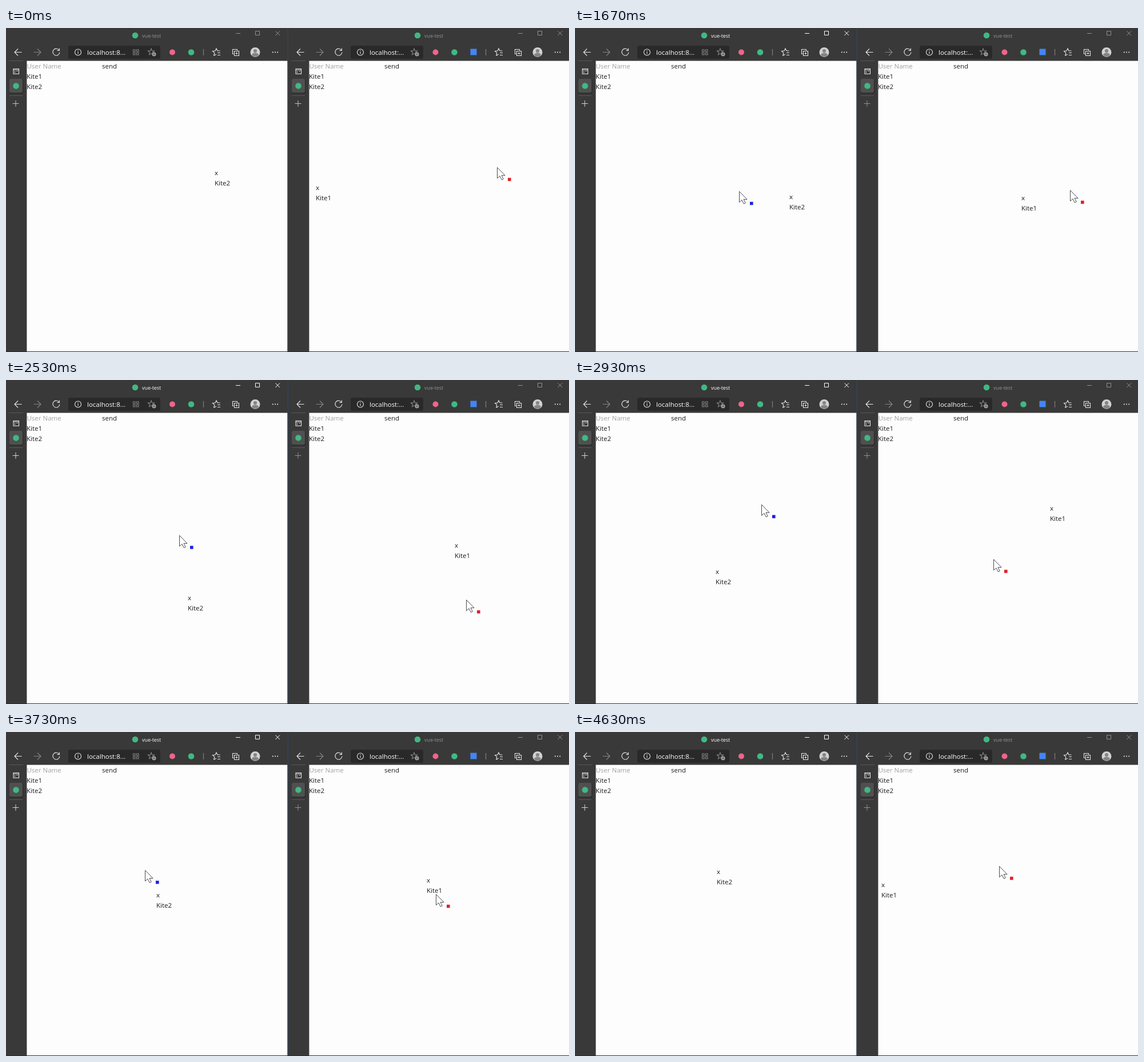
An HTML page for the animation above (5860 ms loop, 985x568 px).

```html
<!DOCTYPE html>
<html lang="en">
<head>
<meta charset="utf-8">
<title>Shared pointers</title>
<style>
  html, body { margin: 0; width: 100%; height: 100%; overflow: hidden; background: #393939; }
  svg { display: block; width: 985px; height: 568px; }
  text { font: 11.5px "Open Sans", "Noto Sans", sans-serif; fill: #1c1c1c; }
  .line { fill: none; stroke: #e8e8e8; stroke-width: 1.1; }
  .dim { stroke: #858585; }
  .faint { stroke: #585858; }
  .url { fill: #fff; }
  .hint { fill: #a0a0a0; }
  .title { font-size: 8.9px; fill: #929292; }
  .frame { fill: none; stroke: #929292; }
  .plus { fill: none; stroke: #c4c4c4; }
  .edge { fill: #3b4650; }
  .active .title { fill: #fff; }
  .active .frame { stroke: #fff; }
  .active .plus { stroke: #d8d8d8; }
  .active .edge { fill: #2c4a68; }
  .blurred .plus { stroke: #909090; }
</style>
</head>
<body>
<svg id="stage" viewBox="0 0 985 568"></svg>
<script>
const LOOP = 5860, START = 570, STEP = 100 / 3;
const FOCUS_AT = 1350, ENTER_AT = 570, LEAVE_AT = 4450;
const OFFSET = 494;
const GREEN = "#41b883";
const users = ["Kite1", "Kite2"];

const dot = (x, y, r, color) => `<circle cx="${x}" cy="${y}" r="${r}" fill="${color}"/>`;
const box = (x, y, w, h, color, r = 0) =>
  `<rect x="${x}" y="${y}" width="${w}" height="${h}" rx="${r}" fill="${color}"/>`;
const line = (d, cls = "line") => `<path class="${cls}" d="${d}"/>`;
const label = (x, y, s, cls = "") => `<text x="${x}" y="${y}" class="${cls}">${s}</text>`;

function star(x, y) {
  const points = Array.from({ length: 10 }, (_, i) => {
    const r = i % 2 ? 2.6 : 6, a = i * Math.PI / 5 - Math.PI / 2;
    return `${x + r * Math.cos(a)} ${y + r * Math.sin(a)}`;
  });
  return line(`M${points.join("L")}Z`, "line dim");
}

function titleBar() {
  return dot(226, 13, 5.3, GREEN) + label(238, 16.5, "vue-test", "title") +
    line("M402 9.5h8M436.5 5.5h7v7h-7zM471.5 5.5l7.5 7.5M479 5.5l-7.5 7.5", "frame");
}

function addressBar(wide) {
  const starX = wide ? 255 : 221;
  return box(109, 31, wide ? 161 : 127, 23, "#292929", 3) +
    `<circle class="line" cx="126" cy="42.5" r="5.5"/>` + line("M126 41.5v4M126 39v1.2") +
    label(142, 46.7, wide ? "localhost:8..." : "localhost:...", "url") +
    (wide ? line("M222.5 38h3.5v3.5h-3.5zm6 0h3.5v3.5h-3.5zm-6 5.5h3.5v3.5h-3.5zm6 0h3.5v3.5h-3.5z", "line dim") : "") +
    star(starX - 1, 42) + dot(starX + 4, 46, 3.5, "#a5a5a5") +
    line(`M${starX + 2} 46h4m-2-2v4`, "line faint");
}

function extensions(wide) {
  const x = wide ? 291 : 257.5;
  return dot(x, 42.5, 5, "#f0648c") + dot(x + 33, 42.5, 5.3, GREEN) +
    (wide ? "" : box(318.5, 36.5, 11, 11, "#4285f4"));
}

function toolbar(wide) {
  return line("M27.5 42.5H15.5M21 36.5l-6 6 6 6") +
    line("M48.5 42.5h12M55 36.5l6 6-6 6", "line dim") +
    line("M93 39a6 6 0 1 0 .9 3.5M93.3 35.5v4h-4") +
    addressBar(wide) + extensions(wide) +
    line("M345.5 37v11", "line dim") +
    line("M374.5 40h-4.5l-2-4-2 4-4.5.6 3.3 3-1 4.7 4-2M370 43.5h5M370 47.5h5") +
    line("M398.5 45.5h-2v-8h8v2M399.5 40.5h8v8h-8zM403.5 42.5v4M401.5 44.5h4") +
    dot(436, 42.5, 8.5, "#d2d2d2") + dot(436, 40, 3.1, "#858585") +
    `<path d="M430 47.5a6 4 0 0 1 12 0 7.5 7.5 0 0 1-12 0z" fill="#858585"/>` +
    [-1, 0, 1].map(i => dot(471 + 4.2 * i, 42.5, 1, "#eee")).join("");
}

function sidebar() {
  return line("M5 57.5h25M6 118.5h23", "line faint") +
    line("M13 71.5h9.5v9H13zM13 73.5h9.5M15.5 76v2.5M18.5 76h2") +
    box(6, 90, 24, 25, "#282828", 3) + box(6, 89, 23, 24.5, "#505050", 3) +
    dot(17.5, 101.5, 5.3, GREEN) +
    line("M11.5 132.5h11M17 127v11", "plus");
}

function browserWindow(id, x, wide) {
  return `<g id="${id}" transform="translate(${x})">` +
    box(0, 0, 493, 568, "#393939") + titleBar() + toolbar(wide) + sidebar() +
    box(36.4, 57.6, 456, 509.4, "#fdfdfd") +
    label(36.5, 71, "User Name", "hint") + label(168, 71, "send") +
    users.map((name, i) => label(36, 89.2 + 18 * i, name)).join("") +
    `<rect class="edge" x="492.6" width="1.2" height="568"/></g>`;
}

const pointer = (id, color) => `<g id="${id}">
  <path d="M.5.5V19.5L5 15.5 8.3 22.2 11.2 20.8 8 14.4H14Z" fill="#fff" stroke="#4a4a52"/>
  ${box(19, 18.7, 5.6, 5.6, color)}</g>`;
const tag = (id, name) => `<g id="${id}">${label(0, 14, "x")}${label(0, 31.6, name)}</g>`;

const $ = id => document.getElementById(id);
$("stage").innerHTML =
  browserWindow("left", 0, true) + browserWindow("right", OFFSET, false) +
  box(0, 567, 985, 1, "#2b2b2b") +
  tag("leftTag", users[1]) + tag("rightTag", users[0]) +
  pointer("blue", "#2020e0") + pointer("red", "#e02028");

// Key poses: time, position, velocity in pixels per step
const pose = (t, x, y, vx = 0, vy = 0) => ({ t, x, y, vx, vy });
const bluePath = [
  pose(537, 48, 270, -34), pose(870, 229, 352, -10, -2), pose(1670, 287, 286, -1, -2),
  pose(2170, 182, 295, 6, 8), pose(2937, 326, 218, -13, 4), pose(3230, 194, 270, 0, 8),
  pose(3737, 243, 242, 0, -8), pose(4140, 260, 285, -8), pose(4450, 42, 258, -15, -1)
];
const redPath = [
  pose(1070, 859, 244, 6, 2), pose(1390, 925, 305, 0, 8), pose(1670, 866, 284, -1),
  pose(2170, 904, 239, -15, -16), pose(2580, 795, 392, -8), pose(2937, 732, 314, -8, -12),
  pose(3230, 712, 200, 10, -5), pose(3737, 752, 284, -6, 8), pose(4200, 775, 245, 2, -8),
  pose(4600, 742, 235)
];

// Cubic curve that passes each pose with its velocity and rests at both ends.
function along(path, time) {
  const t = Math.min(Math.max(time, path[0].t), path.at(-1).t);
  const next = Math.max(1, path.findIndex(p => p.t >= t));
  const a = path[next - 1], b = path[next], span = b.t - a.t;
  const u = (t - a.t) / span, w = 1 - u, steps = span / STEP;
  const blend = (p, v) =>
    a[p] * w * w * (1 + 2 * u) + b[p] * u * u * (3 - 2 * u) +
    steps * u * w * (a[v] * w - b[v] * u);
  return [blend("x", "vx"), blend("y", "vy")];
}

const place = (id, x, y) =>
  $(id).setAttribute("transform", `translate(${Math.round(x)} ${Math.round(y)})`);

function draw(now) {
  const time = now % LOOP;
  const t = START + Math.floor((time - START + 8) / STEP) * STEP;
  place("blue", ...along(bluePath, t));
  place("red", ...along(redPath, t));

  // Each name follows the other window's pointer one step late.
  const [bx, by] = along(bluePath, t - STEP), [rx, ry] = along(redPath, t - STEP);
  place("rightTag", Math.max(bx, 42) + OFFSET, by);
  place("leftTag", rx - OFFSET, ry);

  $("blue").style.display = time >= ENTER_AT && time < LEAVE_AT ? "" : "none";
  const focused = time >= FOCUS_AT;
  $("left").classList.toggle("active", focused);
  $("right").classList.toggle("blurred", focused);
}

function tick() {
  draw(performance.now());
  requestAnimationFrame(tick);
}
tick();
</script>
</body>
</html>
```
